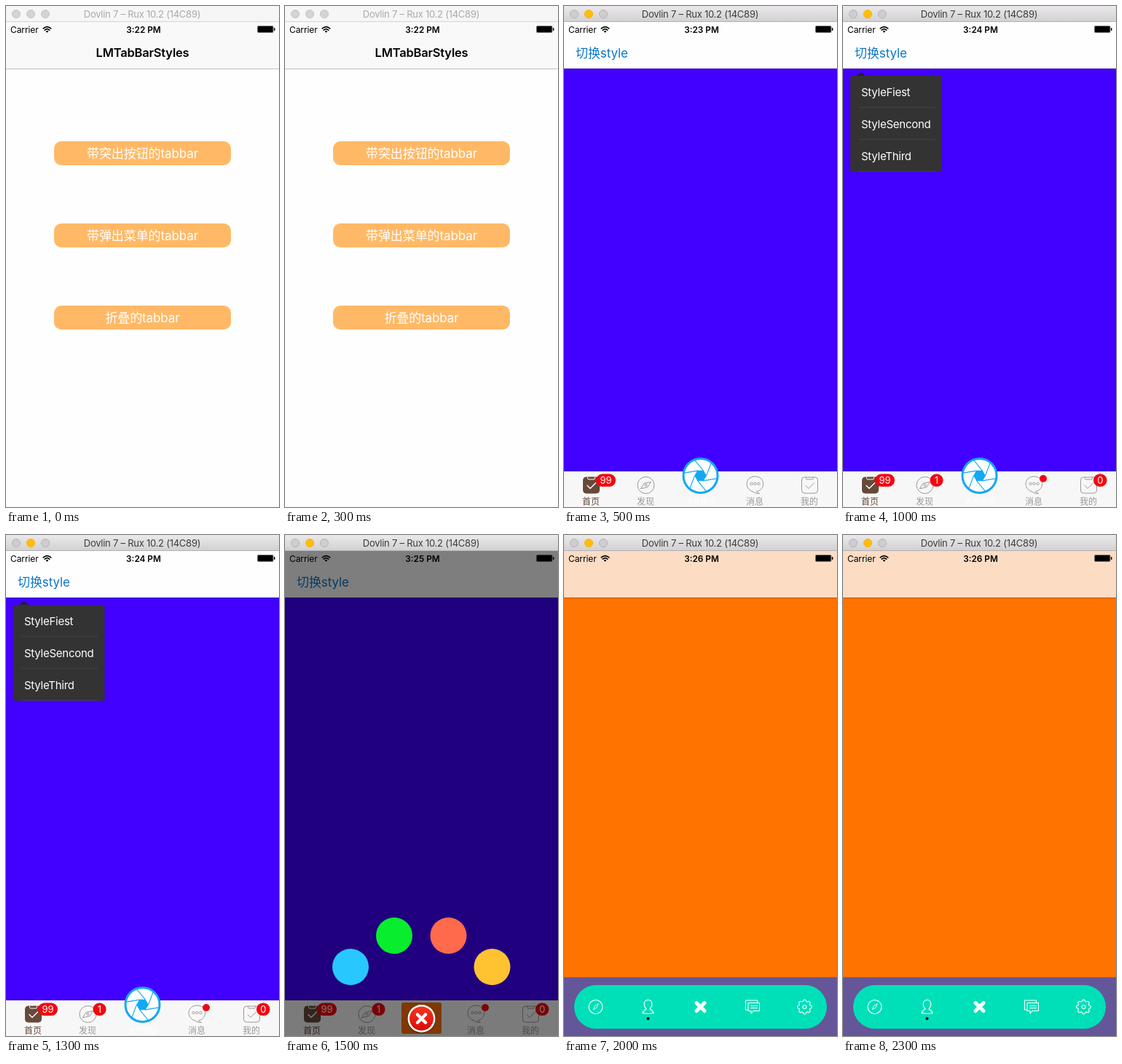
Recreate the animation shown at these times as an HTML page. Size 375 by 689 pixels, loop 2.5 s.

```html
<!DOCTYPE html>
<html lang="zh-CN">
<meta charset="utf-8">
<style>
  html, body { margin: 0; width: 100%; height: 100%; overflow: hidden; background: #fefefe; }
  svg { display: block; width: 375px; height: 689px; font-family: Inter, "Noto Sans CJK SC", "Noto Sans CJK", sans-serif; }
</style>
<svg id="stage" viewBox="0 0 375 689"></svg>
<script>
const stage = document.getElementById('stage');
const SCENE_MS = 500;

const rect = (x, y, w, h, fill, rx = 0) =>
  `<rect x="${x}" y="${y}" width="${w}" height="${h}" rx="${rx}" fill="${fill}"/>`;
const circle = (x, y, r, fill, extra = '') =>
  `<circle cx="${x}" cy="${y}" r="${r}" fill="${fill}" ${extra}/>`;
const line = (d, color, width = 1) =>
  `<path d="${d}" fill="none" stroke="${color}" stroke-width="${width}" stroke-linecap="round" stroke-linejoin="round"/>`;
const text = (s, x, y, size, fill, anchor = 'middle', weight = 400, spacing = 0) =>
  `<text x="${x}" y="${y}" font-size="${size}" fill="${fill}" text-anchor="${anchor}" font-weight="${weight}" letter-spacing="${spacing}">${s}</text>`;
const at = (x, y, content) => `<g transform="translate(${x} ${y})">${content}</g>`;
const hairline = y => rect(0, y, 375, 1, 'rgba(0,0,0,.25)');

const defs = `<defs>
  <linearGradient id="bar" x2="0" y2="1"><stop stop-color="#ebe9eb"/><stop offset="1" stop-color="#d1cfd1"/></linearGradient>
  <linearGradient id="red" x2="0" y2="1"><stop stop-color="#f5351f"/><stop offset="1" stop-color="#d90d08"/></linearGradient>
</defs>`;

function titleBar(active) {
  const light = (x, fill, edge) => circle(x, 11, 5.5, fill, `stroke="${edge}"`);
  const grey = x => light(x, active ? '#cfcdcf' : '#d4d4d4', active ? '#b5b3b5' : '#c4c4c4');
  return rect(0, 0, 375, 22, active ? 'url(#bar)' : '#f6f6f6') +
    rect(0, 21, 375, 1, active ? '#b4b2b4' : '#d4d4d4') +
    grey(14) + (active ? light(34, '#ffbd08', '#f6b40c') : grey(34)) + grey(54) +
    text('Dovlin 7 – Rux 10.2 (14C89)', 187, 16, 13, active ? '#3c3c3c' : '#a9a9a9', 'middle', 400, -.25);
}

function statusBar(time) {
  const wifi = line('M-5.2-4.4Q0-9 5.2-4.4M-3.2-2.2Q0-5 3.2-2.2', '#000', 1.7) +
    '<path d="M0 1.4L-1.9-.6Q0-2 1.9-.6z"/>';
  return text('Carrier', 6, 36.5, 12, '#000', 'start', 400, -.1) + at(56.5, 35.3, wifi) +
    text(time, 189, 36.5, 11.8, '#000', 'middle', 600) +
    rect(345, 27, 22.5, 10, '#777', 2) + rect(346, 28, 20.5, 8, '#000', 1) +
    rect(368, 30, 1.5, 4, '#000', .7);
}

function menu() {
  const button = (y, label) => rect(66, y, 243, 33, '#ffb966', 10) +
    text(label, 187.5, y + 22.5, 17, '#fff', 'middle', 400, -.1);
  return rect(0, 22, 375, 64, '#f9f9f9') + hairline(86) +
    statusBar('3:22 PM') + text('LMTabBarStyles', 187.5, 70, 16.5, '#000', 'middle', 600, -.2) +
    button(186, '带突出按钮的tabbar') + button(299, '带弹出菜单的tabbar') + button(412, '折叠的tabbar');
}

function clipboard(on) {
  const ink = on ? '#fff' : '#999', edge = on ? '#66493a' : ink;
  return `<rect x="-11" y="-11" width="22" height="22" rx="4" fill="${on ? edge : 'none'}" stroke="${edge}"/>` +
    line('M-5-11V-9.5Q-5-8-3.5-8H3.5Q5-8 5-9.5V-11', ink) + line('M-5.5 .5L-1.5 4.5L6-3', ink, on ? 1.4 : 1);
}
const compass = circle(0, 0, 11.5, 'none', 'stroke="#999"') +
  line('M-7 4.5L-2.5-2.5L7-4.5L2.5 2.5z', '#999') + circle(0, 0, 1.5, 'none', 'stroke="#999"');
const bubble = line('M-4 9.5C-15 6-14-11 0-11C14-11 15 7 2 9.7Q3.5 12 6 12.5Q1 13-4 9.5z', '#999') +
  [-5, 0, 5].map(x => circle(x, -1, 1.7, 'none', 'stroke="#999" stroke-width=".9"')).join('');

function shutter() {
  const polar = (r, deg) => [r * Math.cos(deg * Math.PI / 180), r * Math.sin(deg * Math.PI / 180)].map(v => v.toFixed(1)).join(' ');
  const turns = [0, 60, 120, 180, 240, 300];
  return circle(0, 0, 23.5, '#fff', 'stroke="#14a8f4" stroke-width="3"') +
    `<path d="M${turns.map(a => polar(8.3, a)).join('L')}z" fill="#14a8f4"/>` +
    line(turns.map(a => `M${polar(8, a)}L${polar(22.5, a - 50)}`).join(''), '#14a8f4', 1.1);
}

function badge(label, x, w) {
  return rect(x, 643.5, w, 17.5, '#f30510', 8.75) + text(label, x + w / 2, 657, 13, '#fff');
}

function tabBar(allBadges, center) {
  const label = (s, x, on) => text(s, x, 686, 12, on ? '#66493a' : '#999');
  return rect(0, 640, 375, 49, '#f7f7f7') + hairline(639) +
    at(37.5, 659, clipboard(true)) + at(112.5, 659, compass) +
    at(262.5, 658, bubble) + at(337.5, 659, clipboard(false)) +
    label('首页', 37, true) + label('发现', 112) + label('消息', 262) + label('我的', 337) +
    center + badge('99', 44, 27) +
    (allBadges ? badge('1', 119.5, 18) + circle(275, 650, 5, '#f30510') + badge('0', 344, 18.5) : '');
}

function bluePage(time, allBadges, center) {
  return rect(0, 22, 375, 64, '#fefefe') + statusBar(time) +
    text('切换style', 16, 70.5, 17, '#0b76c8', 'start', 400, -.1) +
    rect(0, 86, 375, 554, '#4200ff') + hairline(86) + tabBar(allBadges, center);
}
const raisedButton = at(187.5, 646, shutter()) + text('大号按钮', 187.5, 685, 10, '#fff');

function dropdown() {
  return '<path d="M19 96L25 91L31 96z" fill="#222"/>' + rect(10, 96, 125.5, 132, '#333', 3) +
    ['StyleFiest', 'StyleSencond', 'StyleThird'].map((s, i) =>
      text(s, 25, 123.5 + i * 44, 15, '#fff', 'start', 400, -.25) +
      rect(21, 139 + i * 44, 105, 1, '#424242')).join('');
}

function shareMenu() {
  const cross = line('M-5.5-5.5L5.5 5.5M5.5-5.5L-5.5 5.5', '#fff', 4.5);
  return bluePage('3:25 PM', true, rect(160, 643, 55, 43, '#ff7300', 3)) +
    rect(0, 22, 375, 667, 'rgba(0,0,0,.5)') +
    circle(90, 594, 25, '#28c8fe') + circle(150, 551, 25, '#08ed2d') +
    circle(224.5, 551, 25, '#ff6a4d') + circle(284.5, 594, 25, '#ffc230') +
    at(187.5, 665, circle(0, .5, 20, '#5a3010') + circle(0, 0, 19, '#fff') + circle(0, 0, 16.5, 'url(#red)') + cross);
}

function gear() {
  let d = '';
  for (let i = 0; i < 64; i++) {
    const a = i * Math.PI / 32, r = 8.9 + 1.1 * Math.tanh(2 * Math.cos(8 * a));
    d += (i ? 'L' : 'M') + (r * Math.cos(a)).toFixed(1) + ' ' + (r * Math.sin(a)).toFixed(1);
  }
  return line(d + 'z', '#fff', 1.1) + circle(0, 0, 2.5, 'none', 'stroke="#fff" stroke-width="1.1"');
}

function foldedBar() {
  const white = (d, w = 1.1) => line(d, '#fff', w);
  return rect(0, 22, 375, 64, '#fddcc4') + statusBar('3:26 PM') +
    rect(0, 86, 375, 523, '#ff7300') + hairline(86) + hairline(608) +
    rect(0, 609, 375, 80, '#645699') + rect(14, 619, 347, 60, '#00e0b8', 30) +
    at(43.5, 649, circle(0, 0, 9.5, 'none', 'stroke="#fff" stroke-width="1.1"') + white('M3.5-4L1.2 1.2L-3.5 4L-1.2-1.2z', .8)) +
    at(115.5, 649, white('M-2.5 2.5C-7-2-6-9.5 0-9.5C6-9.5 7-2 2.5 2.5C3 4.5 7 4 7.5 8.5Q0 10-7.5 8.5C-7 4-3 4.5-2.5 2.5z')) +
    circle(115.5, 665, 2, '#111') +
    at(187.5, 649, white('M-5.5-5.5L5.5 5.5M5.5-5.5L-5.5 5.5', 5)) +
    at(259, 649, white('M-7 4H-9.5V-9H6.5V-6.5M-6-5.5H9.5V5.5H1L-2 9V5.5H-6z') + white('M-2.5-1.5H6.5M-2.5 1.5H6.5', 1)) +
    at(330.5, 649, gear());
}

const scenes = [
  titleBar(false) + menu(),
  titleBar(true) + bluePage('3:23 PM', false, raisedButton),
  titleBar(true) + bluePage('3:24 PM', true, raisedButton) + dropdown(),
  titleBar(true) + shareMenu(),
  titleBar(true) + foldedBar()
];

const start = performance.now();
let shown = -1;
function tick() {
  const index = Math.floor((performance.now() - start) / SCENE_MS) % scenes.length;
  if (index !== shown) {
    stage.innerHTML = defs + rect(0, 0, 375, 689, '#fefefe') + scenes[index];
    shown = index;
  }
  requestAnimationFrame(tick);
}
tick();
</script>
</html>
```
